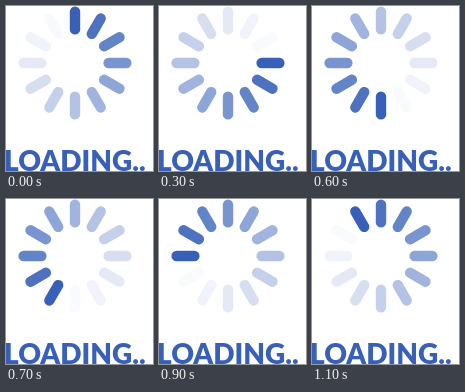
Write an HTML page that moves like this. It is 147x165 px and loops after 1.2 s.

```html
<!DOCTYPE html>
<html lang="en">
<head>
<meta charset="utf-8">
<title>Loading</title>
<style>
  html, body { margin: 0; width: 100%; height: 100%; overflow: hidden; background: #fff; }
  svg { display: block; width: 147px; height: 165px; }
  text { font: 900 28px Lato, sans-serif; }
</style>
</head>
<body>
<svg viewBox="0 0 147 165" fill="#3860b8">
  <g id="wheel" transform="translate(69 57)"></g>
  <text x="-2" y="164.5">LOADING..</text>
</svg>
<script>
const COUNT = 12, STEP = 100;
const wheel = document.getElementById('wheel');

const spokes = Array.from({ length: COUNT }, (_, i) => {
  const bar = document.createElementNS('http://www.w3.org/2000/svg', 'rect');
  const shape = { x: -5.2, y: -56.6, width: 10.4, height: 28.2, rx: 5.2,
                  transform: `rotate(${i * 360 / COUNT})` };
  for (const key in shape) bar.setAttribute(key, shape[key]);
  return wheel.appendChild(bar);
});

// The darkest spoke leads; the others pale clockwise from it.
function draw() {
  const head = Math.floor(performance.now() / STEP) % COUNT;
  spokes.forEach((bar, i) => {
    const offset = (i - head + COUNT) % COUNT;
    const strength = 1 - offset / (COUNT - 1);
    bar.setAttribute('opacity', 0.03 + 0.97 * strength ** 1.3);
  });
  requestAnimationFrame(draw);
}
draw();
</script>
</body>
</html>
```
